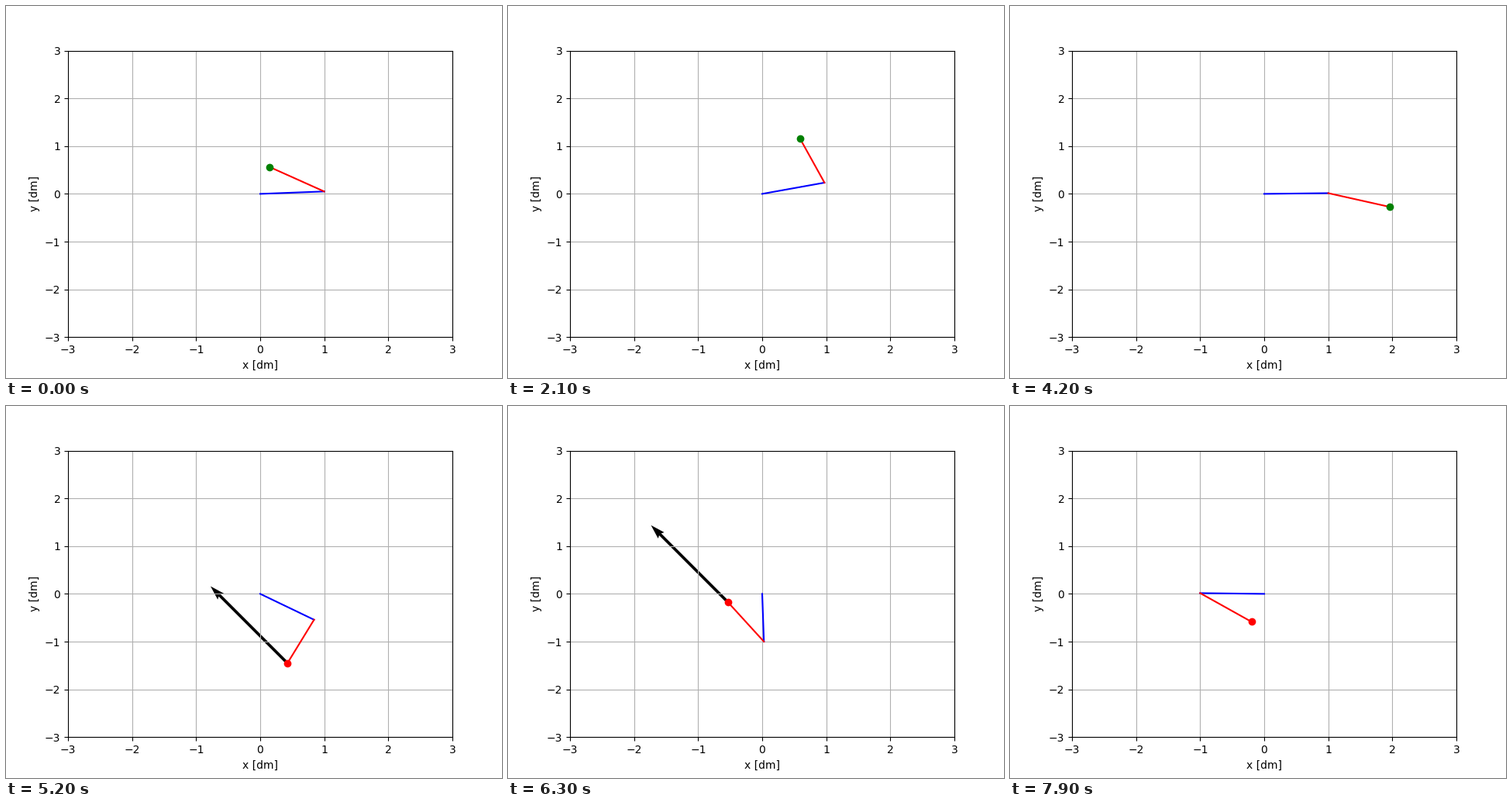
A matplotlib script that plays this animation: 640 px wide and 480 px high, repeating every 8000 ms.

```python
import numpy as np
import matplotlib.pyplot as plt
from matplotlib.animation import FuncAnimation

FRAMES, STEP = 80, 0.1          # frame count, seconds per frame
PUSH_ON, PUSH_OFF = 5.0, 7.0    # the force acts in this span [s]


def shoulder(t):
    """Angle of the first link: a steady turn plus a slow swing."""
    return 0.8525 - 0.4405 * t + 1.013 * np.sin(0.583 * t - 0.914)


def elbow(t):
    """Angle of the second link relative to the first."""
    return -0.79 + 3.34 * np.cos(0.337 * t + 0.01)


def joints(t):
    """Positions of base, elbow and tip for links of unit length."""
    a = shoulder(t)
    b = a + elbow(t)
    links = [[0, 0], [np.cos(a), np.sin(a)], [np.cos(b), np.sin(b)]]
    return np.cumsum(links, axis=0)


fig, ax = plt.subplots(figsize=(6.4, 4.8), dpi=100)
ax.set(xlim=(-3, 3), ylim=(-3, 3), xlabel="x [dm]", ylabel="y [dm]")
ax.grid(True)

upper, = ax.plot([], [], "b-")
lower, = ax.plot([], [], "r-")
tip, = ax.plot([], [], "go")
force = ax.quiver([0], [0], [-1], [1], scale=5, color="k")


def update(i):
    t = round(i * STEP, 3)
    pts = joints(t)
    upper.set_data(*pts[:2].T)
    lower.set_data(*pts[1:].T)
    tip.set_data(*pts[2:].T)
    tip.set_color("g" if t < PUSH_ON else "r")
    force.set_offsets(pts[2:])
    force.set_visible(PUSH_ON <= t < PUSH_OFF)
    return upper, lower, tip, force


anim = FuncAnimation(fig, update, frames=FRAMES, interval=1000 * STEP,
                     init_func=lambda: update(0), repeat=True, repeat_delay=0)
plt.show()
```
